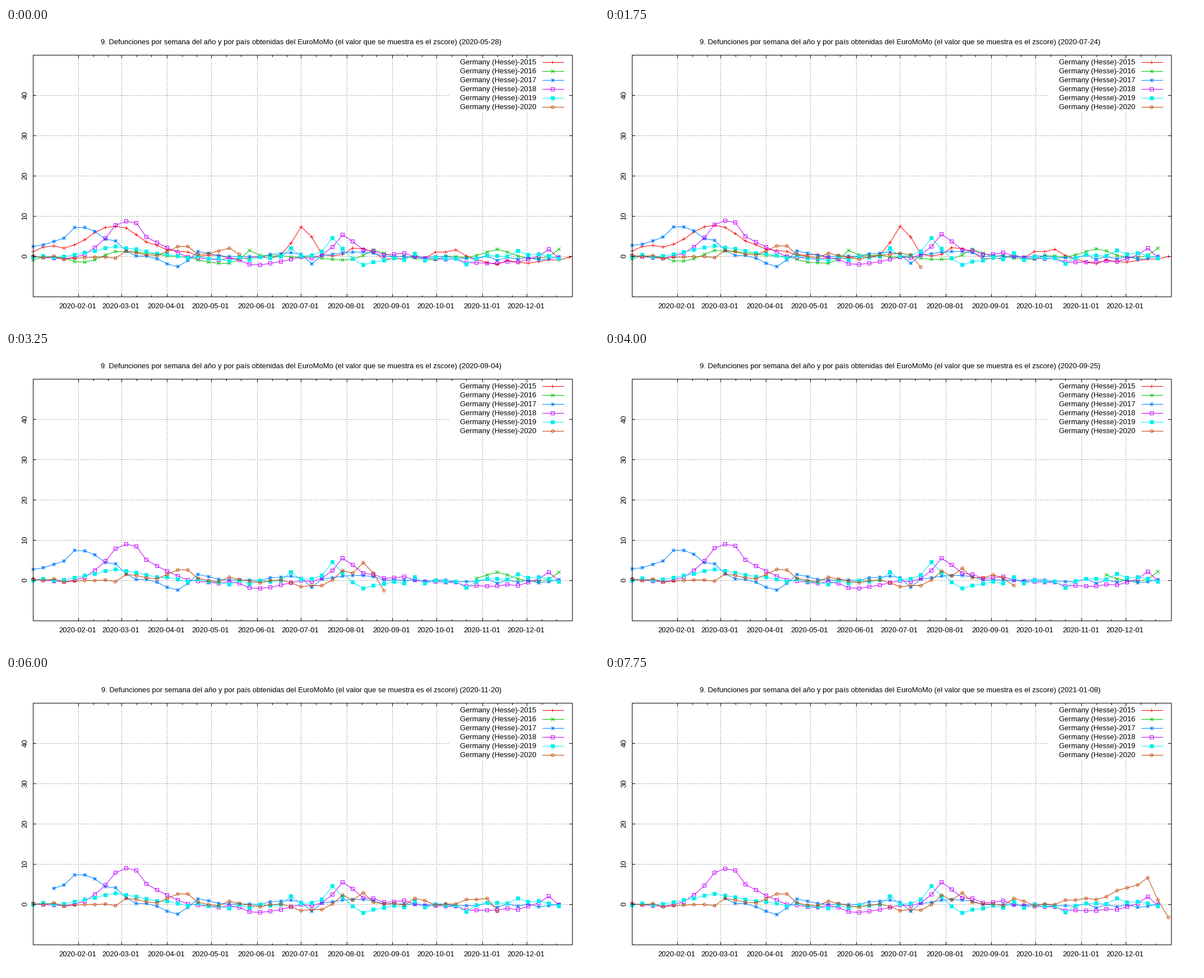
Write a matplotlib script that moves like this. It is 1058 px wide and 529 px high and loops after 8000 ms.

```python
import numpy as np
import matplotlib.pyplot as plt
from matplotlib.animation import FuncAnimation
from matplotlib.patches import Rectangle
from matplotlib.path import Path

W, H = 1058, 529
LEFT, RIGHT, TOP, BOTTOM = 48, 1010, 48, 480
DAY = (RIGHT - LEFT) / 366
FRAMES, STEP = 32, 250
EMPTY = 10          # a release without data
FIRST_WINDOW = 11   # from here on only the last five years are kept

plt.rcParams["font.family"] = "Liberation Sans"
plt.rcParams["font.size"] = 13

asterisk = Path([(-1, 0), (1, 0), (0, -1), (0, 1),
                 (-1, -1), (1, 1), (-1, 1), (1, -1)],
                [Path.MOVETO, Path.LINETO] * 4)

# year, colour, marker, marker size, filled, waves as (week, height, width)
SERIES = [
    (2015, "#ff0000", "+", 6, False,
     [(1.5, 2.5, 1.5), (7.5, 7.5, 2.3), (12.5, 2, 3), (26.1, 7.7, .9),
      (31.6, 2.6, 1), (40.5, 2, 1.2), (46, -1.2, 4)]),
    (2016, "#00c000", "x", 6, False,
     [(5, -1.1, 1), (9.5, 1.6, 2.2), (18.5, -1.5, 1.6), (21, 2.3, .5),
      (30.5, -1, .8), (33, 2, .9), (45, 2, .8), (51, 1.9, .5)]),
    (2017, "#0080ff", asterisk, 6, False,
     [(.8, 3, 1.2), (4.1, 6.8, 1.3), (7, 4.5, 1.6), (14, -2.2, 1.4),
      (16.5, 2, .8), (24.5, 1.1, 1.2), (27, -1.7, .5), (31, 1.4, 2)]),
    (2018, "#c000ff", "s", 6, False,
     [(9, 9.2, 1.9), (13, 1.5, .8), (22.3, -1.7, 1.8), (30.2, 5.6, 1),
      (33, 1.8, .6), (36, 1.1, .8), (44.5, -1.4, 3), (50, 2.6, .5)]),
    (2019, "#00eeee", "s", 6, True,
     [(8, 2.6, 2.8), (18.5, -.8, 1.5), (25, 2.1, .4), (29, 4.7, .7),
      (32.4, -2, .7), (42, -1.6, .5), (48, 1.2, 1.5)]),
    (2020, "#c04000", "o", 5, False,
     [(9.6, 1.6, .9), (14.3, 2.8, 1.1), (27, -1.2, 1.5), (30, 2.8, .6),
      (32, 3.2, .5), (37.3, 1.5, .8), (43.5, 1.6, 1.5), (48.3, 4.4, 1.8),
      (50, 3.8, .5)]),
]


def bell(t, mid, width):
    return np.exp(-.5 * ((t - mid) / width) ** 2)


def year_curve(year, waves):
    weeks = 53 if year in (2015, 2020) else 52
    t = np.arange(weeks)
    noise = np.random.default_rng(year).normal(0, .3, weeks)
    return noise + sum(h * bell(t, mid, width) for mid, h, width in waves)


def pixel(v):
    """Just below the pixel's centre, so that lines and markers snap alike."""
    return np.floor(np.asarray(v) + .5) + .49


def x_pos(days):
    return pixel(LEFT + days * DAY)


def y_pos(z):
    return pixel(408 - 7.2 * np.asarray(z))


def release_date(k):
    if k < 5:
        return np.datetime64("2020-05-28") + int(9.25 * k)
    return np.datetime64("2020-07-10") + 7 * (k - 5)


def scores(year, curve, k):
    """Weeks and z-scores of one year as known in release k."""
    week = np.arange(len(curve))
    winter = .5 + .5 * np.cos(2 * np.pi * week / 52)
    z = curve - .3 * (k / 18 - 1) ** 2 * (.4 + .6 * winter)
    if year == 2020:
        # the newest weeks are provisional: first too low, then too high
        last = min(20 + round(1.25 * k), 21 + k)
        age = last - week
        excess = np.interp(k, [0, 4, 24], [1.8, 2.8, 0])
        z += excess * bell(age, 1.8, 1) - 3 * min(k / 12, 1) * (age == 0)
        keep = age >= 0
    elif k >= FIRST_WINDOW:
        start = -53 if year == 2015 else 52 * (year - 2016)
        keep = start + week >= 30 + k
    else:
        keep = week >= 0
    if k == EMPTY:
        keep = week < 0
    return week[keep], z[keep]


fig = plt.figure(figsize=(W / 72, H / 72), dpi=72, facecolor="white")
ax = fig.add_axes([0, 0, 1, 1])
ax.set_xlim(0, W)
ax.set_ylim(H, 0)
ax.axis("off")


def line(xs, ys, color="black", **kw):
    return ax.plot(xs, ys, color=color, lw=1, **kw)[0]


def tick(x, y, dx, dy):
    line([x, x + dx], [y, y + dy], zorder=4)


L, R, T, B = pixel([LEFT, RIGHT, TOP, BOTTOM])
dots = dict(color="#a0a0a0", ls=(.5, (2, 2)), dash_capstyle="butt", zorder=1)

for z in range(0, 50, 10):
    y = y_pos(z)
    line([L, R], [y, y], **dots)
    tick(L, y, 5, 0)
    tick(R, y, -5, 0)
    ax.text(34.5, y - 1, str(z), rotation=90, ha="center", va="center")

for month in range(2, 13):
    day = np.datetime64(f"2020-{month:02d}-01")
    x = x_pos((day - np.datetime64("2020-01-01")).astype(int))
    line([x, x], [B, T], **dots)
    for shift, size in ((0, 5), (10, 2.5), (20, 2.5)):
        mark = x + shift * DAY
        tick(mark, T, 0, size)
        tick(mark, B, 0, -size)
    ax.text(x - 1.5, 501, str(day), ha="center", va="baseline")

ax.add_patch(Rectangle((790, 54), 214, 94, fc="white", ec="none", zorder=2))
line([L, R, R, L, L], [T, T, B, B, T], zorder=4)
clip = Rectangle((LEFT - 6, TOP), RIGHT - LEFT + 12, BOTTOM - TOP + 1,
                 transform=ax.transData)

plots = []
for n, (year, color, marker, size, filled, waves) in enumerate(SERIES):
    look = dict(color=color, marker=marker, ms=size, mew=1, mec=color,
                mfc=color if filled else "none", zorder=3 + n / 10)
    y = pixel(61 + 15.9 * n)
    ax.text(946, y + 4, f"Germany (Hesse)-{year}", ha="right", va="baseline",
            zorder=3)
    line([957, 975.49, 995], [y] * 3, markevery=[1], **look)
    plot = line([], [], **look)
    plot.set_clip_path(clip)
    plots.append((plot, year, year_curve(year, waves)))

title = ax.text(526.5, 28.5, "", ha="center", va="baseline")


def update(k):
    title.set_text("9. Defunciones por semana del año y por país obtenidas del "
                   "EuroMoMo (el valor que se muestra es el zscore) "
                   f"({release_date(k)})")
    for plot, year, curve in plots:
        week, z = scores(year, curve, k)
        plot.set_data(x_pos(7 * week), y_pos(z))
    return [title, *(plot for plot, *_ in plots)]


anim = FuncAnimation(fig, update, frames=FRAMES, interval=STEP,
                     init_func=lambda: update(0), repeat=True, repeat_delay=0)
plt.show()
```
